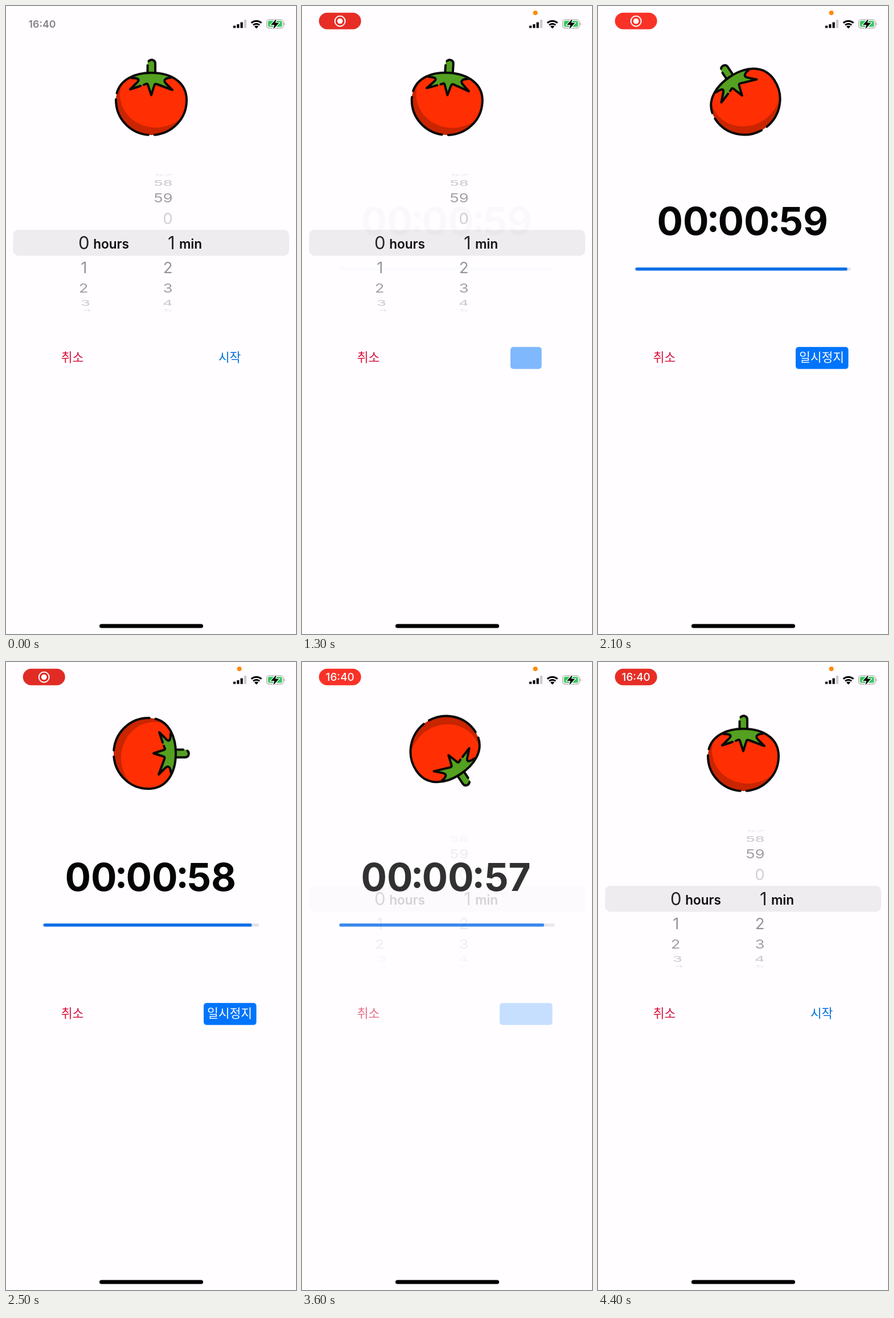
These frames come from a looping animation (509x1100 px, 4500 ms). An HTML page:

```html
<!DOCTYPE html>
<html lang="ko">
<head>
<meta charset="utf-8">
<title>Tomato timer</title>
<style>
  html, body { margin: 0; width: 100%; height: 100%; overflow: hidden; background: #fffdff; }
  svg { display: block; width: 100%; height: 100%; font-family: Inter, Roboto, sans-serif; }
  .ko { font: 350 21.5px "Noto Sans CJK KR", "Noto Sans CJK", sans-serif; }
  .mid { text-anchor: middle; }
  .end { text-anchor: end; }
  .line { fill: none; stroke: #090909; stroke-width: 4; stroke-linecap: round; stroke-linejoin: round; }
</style>
</head>
<body>
<svg viewBox="0 0 509 1100">
  <defs>
    <path id="body" pathLength="100" d="M193 165C193 132 222 117 255 117S317 132 317 165C317 200 288 226 255 226S193 200 193 165Z"/>
    <clipPath id="bodyClip"><use href="#body"/></clipPath>
  </defs>

  <!-- status bar -->
  <text id="clock" x="63.5" y="37.5" class="mid" font-size="17.7" font-weight="600" fill="#858186">16:40</text>
  <g id="pill">
    <rect id="pillShape" x="29.7" y="11.8" width="74" height="29" rx="14.5"/>
    <g id="record">
      <circle cx="66.7" cy="26.5" r="9" fill="none" stroke="#fff" stroke-width="2"/>
      <circle cx="66.7" cy="26.5" r="4.8" fill="#fff"/>
    </g>
    <text id="pillClock" x="66.7" y="33.3" class="mid" font-size="19" font-weight="500" fill="#fff">16:40</text>
  </g>
  <circle id="dot" cx="409.5" cy="12" r="4" fill="#ff8a0c"/>
  <path d="M401 34.5V38.5M407.3 32V38.5M413.6 28.5V38.5" stroke="#000" stroke-width="4.2"/>
  <path d="M419.9 24V38.5" stroke="#cccacd" stroke-width="4.2"/>
  <g fill="none" stroke="#000" stroke-width="3">
    <path d="M430.6 29.6A13.2 13.2 0 0 1 448.4 29.6"/>
    <path d="M434 33.4A8.2 8.2 0 0 1 445 33.4"/>
  </g>
  <path d="M436 35.9A5 5 0 0 1 443 35.9L439.5 39.5Z"/>
  <rect x="457.6" y="23.8" width="29" height="15" rx="4.5" fill="none" stroke="#a9a7aa" stroke-width="1.3"/>
  <path d="M488.2 29V34Q489.8 33.4 489.8 31.5T488.2 29" fill="#a9a7aa"/>
  <rect x="459.8" y="26" width="24.6" height="10.6" rx="2.8" fill="#30c65c"/>
  <path d="M474.5 22.5L464.8 33H471L469.2 40.5L479.2 29.6H472.8Z" stroke="#fff" stroke-width="2.4" paint-order="stroke"/>

  <!-- tomato -->
  <g id="tomato">
    <use href="#body" fill="#c92500"/>
    <ellipse cx="263" cy="155" rx="63" ry="58" fill="#ff2f03" clip-path="url(#bodyClip)"/>
    <path d="M248.5 117V99Q249 94 255 94T262 100V117Z" fill="#54a020"/>
    <path d="M220 125Q238 117 255 117T290 125L278 130L292 147L263 136L255 156L248 136L218 146L233 130Z" fill="#54a020"/>
    <use href="#body" class="line" stroke-dasharray="0.4 3 68.9 3 24.7"/>
    <path class="line" d="M248.5 116V104M250.5 96.5Q253 94 256 94.2Q262 95 262 101V116"/>
    <path class="line" d="M220 126Q229 126 232 128Q234 131 229 135L218 146L236 140M242 138L247 136Q249 136 250 141L255 156L260 140Q261 135 265 137L292 147L281 136Q276 131 280 128Q283 126 289 125.5"/>
  </g>

  <!-- time picker -->
  <g id="picker">
    <rect x="12.5" y="392" width="484.5" height="45.5" rx="9" fill="#eeecef"/>
    <g id="wheel"></g>
    <g font-size="31" fill="#242326" class="end">
      <text x="146.5" y="425.5">0</text><text x="296.5" y="425.5">1</text>
    </g>
    <g font-size="22.6" font-weight="600" fill="#0b0a0c">
      <text x="153.2" y="424.8">hours</text><text x="304" y="424.8">min</text>
    </g>
  </g>

  <!-- countdown -->
  <g id="countdown">
    <g class="mid" font-size="67.5" font-weight="700" fill="#050505">
      <text x="149" y="401.3">00</text><text x="202" y="395">:</text>
      <text x="256" y="401.3">00</text><text x="309.5" y="395">:</text>
      <text id="seconds" x="361" y="401.3">59</text>
    </g>
    <rect x="65.5" y="458" width="378.5" height="5.6" rx="2.8" fill="#e5e3e6"/>
    <rect id="progress" x="65.5" y="458" height="5.6" rx="2.8" fill="#0f70e8"/>
  </g>

  <!-- buttons -->
  <text id="cancel" x="116.5" y="623.3" class="ko mid" fill="#d6103c">취소</text>
  <rect id="button" y="597.2" height="38.6" rx="5" fill="#0074fb"/>
  <text id="start" x="392.5" y="623.3" class="ko mid" fill="#0070d9">시작</text>
  <text id="pause" x="392.5" y="623.3" class="ko mid" fill="#fff">일시정지</text>

  <rect x="164" y="1082.5" width="182" height="7" rx="3.5"/>
</svg>
<script>
const LOOP = 4500, STEP = 100;
const START = 1250, CANCEL = 3455, FADE = 500, HALF_TURN = 500;
const $ = id => document.getElementById(id);
const show = (id, opacity) => $(id).setAttribute('opacity', opacity);
const ramp = (t, from, to) => Math.min(1, Math.max(0, (t - from) / (to - from)));

// cubic-bezier(.42, 0, .58, 1)
function easeInOut(x) {
  let low = 0, high = 1;
  for (let i = 0; i < 24; i++) {
    const s = (low + high) / 2;
    const bx = 1.26 * s * (1 - s) ** 2 + 1.74 * s * s * (1 - s) + s ** 3;
    if (bx < x) low = s; else high = s;
  }
  return low * low * (3 - 2 * low);
}
const ease = (t, from, to) => easeInOut(ramp(t, from, to));

// wheel rows: hour, minute, centre y, vertical squeeze, colour, hour's right edge
const rows = [
  ['', 57, 296, 0.18, '#e6e4e7', 0], ['', 58, 310, 0.5, '#c8c6c9', 0],
  ['', 59, 336, 0.8, '#a09ea1', 0], ['', 0, 372, 1, '#d2d0d3', 0],
  [1, 2, 457.5, 1, '#959396', 142.5], [2, 3, 494, 0.8, '#a19fa2', 144.5],
  [3, 4, 520, 0.5, '#c8c6c9', 148], [4, 5, 533, 0.18, '#e6e4e7', 151]
];
$('wheel').innerHTML = rows.map(([hour, minute, y, squeeze, color, right]) =>
  `<g transform="translate(0 ${y}) scale(1 ${squeeze})" font-size="27.5" class="end" fill="${color}">
    <text x="${right}" y="10">${hour}</text><text x="292.5" y="10">${minute}</text></g>`).join('');

function drawStatus(t) {
  const pulse = (1 + Math.cos((t - 1850) / 1000 * Math.PI)) / 2;
  const swap = ramp(t, 3200, 3500);
  $('pillShape').setAttribute('fill', `rgb(${212 + 43 * pulse},${42 + 9 * pulse},${36 + 5 * pulse})`);
  show('clock', 1 - ramp(t, 0, 200));
  show('pill', ramp(t, 50, 350));
  show('dot', ramp(t, 50, 350));
  show('record', 1 - swap);
  show('pillClock', swap);
}

function drawTimer(t) {
  const turns = Math.min(6, Math.max(0, (t - START) / HALF_TURN));
  const whole = Math.floor(turns);
  const angle = 180 * (whole + easeInOut(turns - whole));
  $('tomato').setAttribute('transform', `rotate(${angle} 255 160)`);

  const running = ease(t, START, START + FADE) - ease(t, CANCEL, CANCEL + FADE);
  const seconds = 59 - Math.min(2, Math.max(0, Math.floor((t - START) / 1000)));
  show('countdown', running);
  show('picker', 1 - running);
  $('seconds').textContent = seconds;
  $('progress').setAttribute('width', 378.5 * seconds / 60);
}

function drawButtons(t) {
  const width = 53.5 + 39 * ease(t, START, START + 400);
  $('button').setAttribute('x', 393.2 - width / 2);
  $('button').setAttribute('width', width);
  show('button', ramp(t, START, 1350) - ramp(t, CANCEL, 3642));
  show('start', 1 - ramp(t, 1240, 1300) + ramp(t, 3620, 3850));
  show('pause', ramp(t, 1350, 1600) - ramp(t, 3400, 3580));
  show('cancel', 1 - 0.8 * (ramp(t, 3300, 3400) - ramp(t, 3450, 3750)));
}

function frame(now) {
  const t = Math.floor(now % LOOP / STEP) * STEP;
  drawStatus(t);
  drawTimer(t);
  drawButtons(t);
  requestAnimationFrame(frame);
}
frame(0);
</script>
</body>
</html>
```
